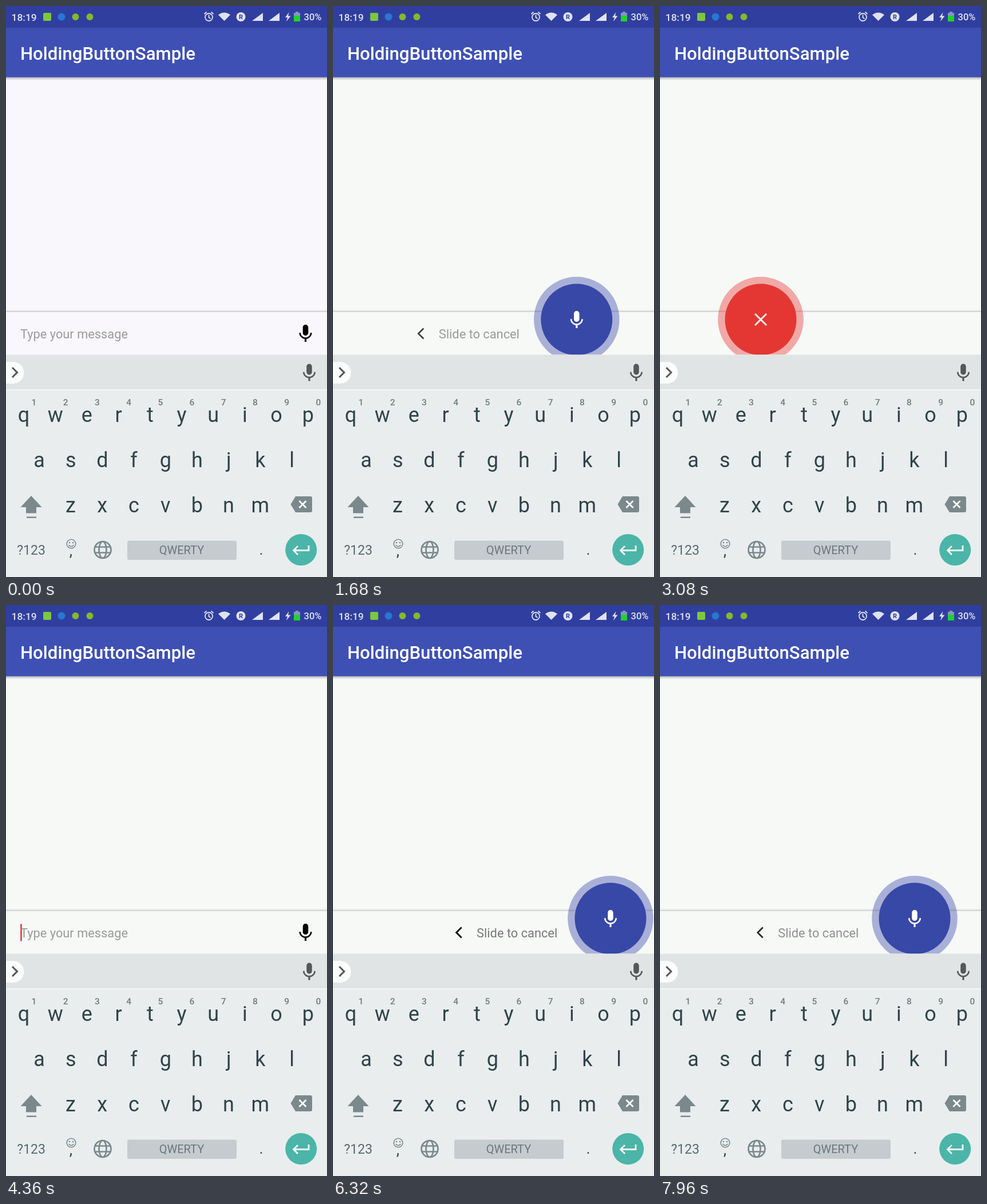
An HTML page that plays this animation: 561 px wide and 998 px high, repeating every 8 s.

```html
<!DOCTYPE html>
<html lang="en">
<head>
<meta charset="utf-8">
<title>HoldingButtonSample</title>
<style>
  html, body { margin: 0; width: 100%; height: 100%; overflow: hidden; }
  svg { display: block; width: 100vw; height: 100vh; }
  text { font-family: Roboto, sans-serif; }
  .medium { font-weight: 500; }
  .mid { text-anchor: middle; }
  .line { fill: none; stroke: currentColor; }
</style>
</head>
<body>
<svg viewBox="0 0 561 998">
  <defs>
    <path id="mic" transform="scale(1.58) translate(-12 -11.5)" d="M12 14c1.66 0 3-1.34 3-3V5c0-1.66-1.34-3-3-3S9 3.34 9 5v6c0 1.66 1.34 3 3 3zm5.3-3c0 3-2.54 5.1-5.3 5.1S6.7 14 6.7 11H5c0 3.41 2.72 6.23 6 6.72V21h2v-3.28c3.28-.48 6-3.3 6-6.72h-1.7z"/>
    <linearGradient id="shade" x2="0" y2="1">
      <stop stop-color="#000" stop-opacity=".28"/>
      <stop offset="1" stop-color="#000" stop-opacity="0"/>
    </linearGradient>
    <clipPath id="aboveKeys"><path d="M0 0H561V609.5H0z"/></clipPath>
  </defs>

  <rect width="561" height="998" fill="#f7f9f7"/>
  <rect id="tint" y="124" width="561" height="486" fill="#f9f7fc"/>
  <rect y="124" width="561" height="6" fill="url(#shade)"/>
  <rect y="38" width="561" height="86.500" fill="#3e50b4"/>
  <rect width="561" height="38" fill="#303f9f"/>
  <text x="24.900" y="94" font-size="31.200" class="medium" fill="#fff">HoldingButtonSample</text>

  <!-- status bar -->
  <g fill="#dfe2f3" color="#dfe2f3">
    <text x="9.500" y="25.500" font-size="17.400" class="medium">18:19</text>
    <text x="520.500" y="25" font-size="16.500" class="medium">30%</text>
    <rect x="65" y="12" width="14" height="14" rx="2" fill="#7cc83c"/>
    <circle cx="97" cy="19" r="6.500" fill="#2678d4"/>
    <circle cx="121.500" cy="19" r="6" fill="#86b82c"/>
    <circle cx="146.500" cy="19" r="6" fill="#86b82c"/>
    <g class="line" stroke-width="1.800">
      <circle cx="354.500" cy="19.500" r="6.500"/>
      <path d="M354.500 15.500v4.500l3 2M346.500 14l4-3.500M362.500 14l-4-3.500"/>
    </g>
    <path d="M371 15.500Q381.500 7.500 392 15.500L381.500 26z"/>
    <circle cx="410.500" cy="19" r="8"/>
    <text x="410.500" y="23" font-size="11" font-weight="700" class="mid" fill="#303f9f">R</text>
    <path d="M430 26L449 12V26zM459 26L478 12V26z"/>
    <path d="M494.500 11L488 20h4l-2 7 7.500-9.500h-4.500z"/>
    <path d="M503 12h3v-2h5v2h3v6h-11z" fill="#8a92c4"/>
    <rect x="503" y="17" width="11" height="10" fill="#1ed42a"/>
  </g>

  <!-- message bar -->
  <rect y="531" width="561" height="2" fill="#ecedec"/>
  <rect y="533" width="561" height="2" fill="#d3d5d4"/>
  <g id="input">
    <text x="25" y="581" font-size="21.800" fill="#9a9b9a">Type your message</text>
    <rect id="cursor" x="25" y="557.500" width="3" height="30" fill="#e2505c"/>
  </g>
  <use id="inputMic" href="#mic" x="523.500" y="572"/>
  <g id="slide">
    <path d="M-26.500 -17.500L-35.500 -8.500L-26.500 .500" class="line" stroke-width="2.800"/>
    <text font-size="21.800" fill="#797979">Slide to cancel</text>
  </g>
  <g clip-path="url(#aboveKeys)">
    <g id="button">
      <circle r="74.800" opacity=".41"/>
      <circle r="62.500"/>
      <use id="holdMic" href="#mic" fill="#fff"/>
      <path id="cross" d="M-10 -10L10 10M10 -10L-10 10" stroke="#fff" stroke-width="2.800"/>
    </g>
  </g>

  <!-- keyboard -->
  <rect y="609.500" width="561" height="61" fill="#e0e4e5"/>
  <rect y="670" width="561" height="328" fill="#e9eded"/>
  <rect y="670" width="561" height="2" fill="#f3f6f6"/>
  <path d="M0 622H12.500a19 19 0 0 1 0 38H0z" fill="#fbfcfc"/>
  <path d="M11 632l8.500 8.500l-8.500 8.500" class="line" color="#555" stroke-width="3"/>
  <use href="#mic" x="530" y="640.500" fill="#555759"/>
  <g id="keys" class="mid" fill="#30444a"></g>
  <g fill="#7b898c" color="#7b898c">
    <path d="M44 856L62.500 876H53V886.500H35V876H25.500zM36 892.500H53V895H36z"/>
    <path d="M506 857H532q3 0 3 3V882q0 3-3 3H506L497.500 871z"/>
    <path d="M512.500 865l12 12M524.500 865l-12 12" stroke="#fff" stroke-width="2.800"/>
    <g class="line" stroke-width="1.600">
      <circle cx="114" cy="940" r="7.800"/>
      <path d="M109.500 942q4.500 5 9 0"/>
    </g>
    <circle cx="111" cy="938" r="1.300"/><circle cx="117" cy="938" r="1.300"/>
    <g class="line" stroke-width="2.700">
      <circle cx="169" cy="950.500" r="14.500"/>
      <ellipse cx="169" cy="950.500" rx="6.500" ry="14.500"/>
      <path d="M155.500 945.500H182.500M155.500 955.500H182.500"/>
    </g>
  </g>
  <rect x="212" y="934.500" width="191" height="33.500" rx="3" fill="#c5cbcf"/>
  <g class="mid" fill="#5c6a6e">
    <text x="44" y="958.500" font-size="23">?123</text>
    <text x="307" y="958" font-size="20" fill="#6b777c">QWERTY</text>
    <text x="113.500" y="961" font-size="27" fill="#30444a">,</text>
    <text x="446" y="958.500" font-size="25" fill="#30444a">.</text>
  </g>
  <circle cx="515.700" cy="950.500" r="27.500" fill="#4ab5a8"/>
  <path d="M529 943v8.500H503M510 944l-7.500 7.500l7.500 7.500" class="line" color="#fff" stroke-width="2.800"/>
</svg>
<script>
const LOOP = 8000, REST_X = 485, WIDTH = 561, CANCEL_X = 317, FADE = 200;
const BLUE = [56, 72, 167], RED = [228, 55, 51];
const HOLDS = [
  { start: 960, end: 4050, path: [[1200, REST_X], [1680, 426], [2200, 330], [2700, 205], [3080, 176]] },
  { start: 6050, end: LOOP, path: [[6350, REST_X], [7040, 261], [7400, 165], [7520, 165], [7740, 350], [7960, 445]] }
];
const $ = id => document.getElementById(id);
const clamp = v => Math.min(1, Math.max(0, v));
const ease = v => v * v * (3 - 2 * v);
const mix = (a, b, k) => a + (b - a) * k;

function addKey(label, x, y, attrs) {
  const key = document.createElementNS("http://www.w3.org/2000/svg", "text");
  key.textContent = label;
  for (const [name, value] of Object.entries({ x, y, ...attrs })) key.setAttribute(name, value);
  $("keys").append(key);
}
[["qwertyuiop", 31, 727], ["asdfghjkl", 58, 806], ["zxcvbnm", 113, 885]].forEach(([row, x, y]) =>
  [...row].forEach((letter, i) => addKey(letter, x + i * 55.2, y, { "font-size": 36 })));
[..."1234567890"].forEach((digit, i) =>
  addKey(digit, 49 + i * 55.2, 698, { "font-size": 15.5, class: "medium", fill: "#6f7c80" }));

function along(path, t) {
  if (t <= path[0][0]) return path[0][1];
  const i = path.findIndex(point => point[0] > t);
  if (i < 0) return path.at(-1)[1];
  const [t0, x0] = path[i - 1], [t1, x1] = path[i];
  return mix(x0, x1, (t - t0) / (t1 - t0));
}

function draw(t) {
  const hold = HOLDS.find(h => t >= h.start && t < h.end + FADE);
  const open = hold ? ease(clamp((t - hold.start) / FADE) * (1 - clamp((t - hold.end) / FADE))) : 0;
  const x = hold ? along(hold.path, t) : REST_X;
  const offset = (REST_X - x) / WIDTH;
  const danger = clamp((CANCEL_X + 12 - x) / 24);

  $("tint").setAttribute("opacity", 1 - clamp((t - 80) / 500));
  $("input").setAttribute("opacity", 1 - open);
  $("input").setAttribute("transform", `translate(${-14 * open})`);
  $("inputMic").setAttribute("opacity", 1 - open);
  // The caret blinks half a second on, half a second off.
  $("cursor").setAttribute("opacity", (t + 775) % 1000 < 500 ? 1 : 0);

  $("slide").setAttribute("opacity", open * clamp(1 - 2.5 * offset));
  $("slide").setAttribute("transform", `translate(${185 + (x - 426) * 1.12} 581)`);

  $("button").setAttribute("transform", `translate(${x} 548) scale(${mix(0.3, 1, open)})`);
  $("button").setAttribute("opacity", clamp(open * 2));
  $("button").setAttribute("fill", `rgb(${BLUE.map((c, i) => mix(c, RED[i], danger))})`);
  $("holdMic").setAttribute("opacity", danger < 0.5 ? 1 : 0);
  $("cross").setAttribute("opacity", danger < 0.5 ? 0 : 1);
}

const begin = performance.now();
function tick() {
  draw((performance.now() - begin) % LOOP);
  requestAnimationFrame(tick);
}
tick();
</script>
</body>
</html>
```
